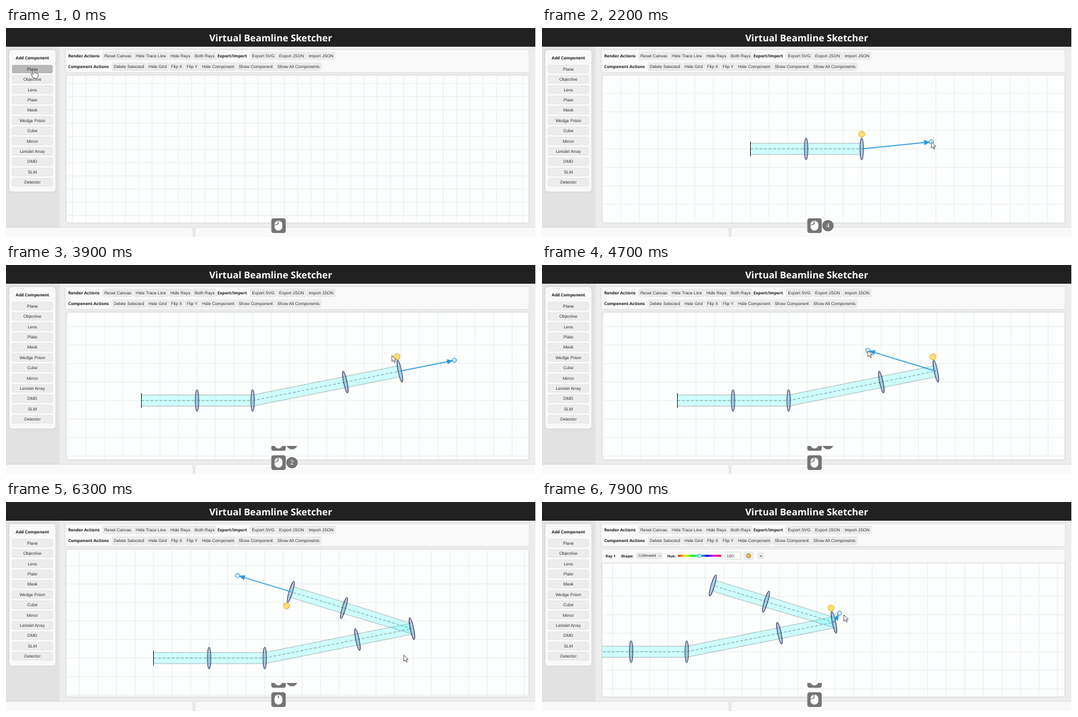
An HTML page for the animation above (8 s loop, 792 by 313 pixels).

```html
<!DOCTYPE html>
<html lang="en">
<head>
<meta charset="utf-8">
<title>Optics editor</title>
<style>
html, body { margin: 0; width: 100%; height: 100%; overflow: hidden; background: #fff; }
svg { display: block; width: 792px; height: 313px; }
text { font: 6.43px "Liberation Sans", Arial, sans-serif; fill: #333; text-rendering: geometricPrecision; }
text.b { font: bold 6.2px "Open Sans", "Noto Sans", sans-serif; fill: #1a1a1a; }
text.s { font-size: 5.6px; }
text.title { font: bold 14.1px "Open Sans", "Noto Sans", sans-serif; fill: #fff; }
.m { text-anchor: middle; }
.btn { fill: #ededed; stroke: #dedede; stroke-width: .7; }
.btn.on { fill: #b8b8b8; stroke: #a8a8a8; }
.card { fill: #f9f9f9; filter: drop-shadow(0 .5px 1px #0002); }
.lens { fill: #7aa6d488; stroke: #2a3350; stroke-width: .95; }
.grid { stroke: #e9ecec; stroke-width: .9; }
.edge { stroke: #555; stroke-width: .75; stroke-dasharray: 1.3 1.3; }
.axis { stroke: #55787c; stroke-width: .7; stroke-dasharray: 4.2 2.6; }
.beam { fill: #00ffff2e; }
.ray { stroke: #2a9ae0; stroke-width: 1.4; }
.cursor { stroke: #333; stroke-width: .75; fill: #fff; stroke-linejoin: round; }
</style>
</head>
<body>
<svg viewBox="0 0 792 313">
  <defs>
    <clipPath id="view"><rect x="89.5" y="70.5" width="692" height="221.5" rx="4"/></clipPath>
    <clipPath id="strip"><rect x="390" y="271" width="50" height="9"/></clipPath>
    <linearGradient id="hue"></linearGradient>
  </defs>
  <rect width="791" height="313" fill="#ededed"/>
  <rect width="80" height="313" fill="#e2e2e2"/>
  <rect width="791" height="28" fill="#212121"/>
  <text class="title m" x="395.5" y="20">Virtual Beamline Sketcher</text>
  <rect class="card" x="5" y="33" width="69" height="212" rx="4"/>
  <rect class="card" x="89" y="33" width="692.5" height="33" rx="2"/>
  <rect class="card" x="-5" y="299" width="284" height="20" rx="4"/>
  <rect class="card" x="283" y="299" width="515" height="20" rx="4"/>
  <rect x="791" width="1" height="313" fill="#fff"/>
  <rect x="89.5" y="70.5" width="692" height="221.5" rx="4" fill="#fdfefe" stroke="#d4d4d4"/>
  <g id="ui"></g>
  <g id="scene" clip-path="url(#view)"></g>
  <g id="overlay"></g>
</svg>
<script>
const $ = id => document.getElementById(id);
const LOOP = 8000, CELL = 27.7, STEP = 3 * CELL;

// Interface
const parts = ['Plane', 'Objective', 'Lens', 'Plate', 'Mask', 'Wedge Prism', 'Cube', 'Mirror',
  'Lenslet Array', 'DMD', 'SLM', 'Detector'];
// Items with a star are labels, the others buttons
const bars = [
  '*Render Actions,Reset Canvas,Hide Trace Line,Hide Rays,Both Rays,*Export/Import,Export SVG,Export JSON,Import JSON',
  '*Component Actions,Delete Selected,Hide Grid,Flip X,Flip Y,Hide Component,Show Component,Show All Components'
];
const text = (s, x, y, cls = '') => `<text class="${cls}" x="${x}" y="${y}">${s}</text>`;
const box = (x, y, w, h, id = '') =>
  `<rect class="btn" id="${id}" x="${x}" y="${y}" width="${w}" height="${h}" rx="1.5"/>`;
const partY = i => 61.5 + i * 15.41;

$('ui').innerHTML = text('Add Component', 39.5, 47, 'b m') + parts.map((s, i) =>
  box(9.5, partY(i) - 5.7, 59.7, 11.4, s) + text(s, 39.4, partY(i) + 2.3, 'm')).join('');

function toolbar(items, y) {
  const pad = 2.4;
  let x = 93;
  for (const item of items.split(',')) {
    const label = item[0] === '*';
    $('ui').insertAdjacentHTML('beforeend',
      label ? text(item.slice(1), x, y + 2.3, 'b') : text(item, x + pad, y + 2.3));
    const el = $('ui').lastElementChild, w = el.getComputedTextLength();
    if (!label) el.insertAdjacentHTML('beforebegin', box(x, y - 5.6, w + 2 * pad, 11.2));
    x += w + (label ? 4.8 : 2 * pad + 1.9);
  }
}
bars.forEach((items, i) => toolbar(items, 41.6 + i * 16.2));

$('hue').innerHTML = [...Array(7).keys()]
  .map(i => `<stop offset="${i / 6}" stop-color="hsl(${i * 60},90%,50%)"/>`).join('');
const rayBar = `<rect x="89" y="70" width="693" height="21" fill="#fafafa"/>
  <path d="M89 91.3H782" stroke="#d6d6d6"/>` +
  text('Ray 1', 95, 82.5, 'b s') + text('Shape:', 118, 82.5, 'b s') + text('Hue:', 187, 82.5, 'b s') +
  box(141.5, 76.5, 38, 8) + text('Collimated', 144, 82.3, 's') +
  `<path d="M174.5 79.7l1.5 1.6 1.5-1.6" fill="none" stroke="#555" stroke-width=".7"/>
  <rect x="203" y="79" width="65" height="3" rx="1.5" fill="url(#hue)"/>
  <circle cx="235.5" cy="80.5" r="2.5" fill="#eff" stroke="#2aa" stroke-width=".9"/>
  <rect x="273" y="75" width="24" height="10.5" fill="#fff" stroke="#ccc" stroke-width=".7"/>` +
  text('180', 276, 82.6) + box(302, 75, 13.5, 11) +
  '<circle cx="308.7" cy="80.5" r="3.1" fill="#f2c230" stroke="#775b20" stroke-width=".7"/>' +
  box(322.5, 76, 9, 8.5) + text('+', 327, 82.5, 'm b s');

const add = (a, b) => a.map((v, i) => v + b[i]);
const mix = (a, b, k) => a.map((v, i) => v + (b[i] - v) * k);
const ease = (t, a, b) => {
  const k = Math.min(1, Math.max(0, (t - a) / (b - a)));
  return k * k * (3 - 2 * k);
};
const turn = (a, b) => Math.atan2(b[1] - a[1], b[0] - a[0]);
const degrees = a => a * 180 / Math.PI;

// Each new component sits at the previous ray's end, which may have been dragged
const dragged = { 3: [11 * CELL, -CELL], 5: [284.6, -75] };
const P = [[0, 0]], angles = [0];
const freeEnd = i => add(P[i], [STEP * Math.cos(angles[i]), STEP * Math.sin(angles[i])]);
for (let i = 1; i < 7; i++) {
  P[i] = dragged[i] || freeEnd(i - 1);
  angles[i] = turn(P[i - 1], P[i]);
}

// The view centres on the components and the last ray
function origin(n) {
  const pts = P.slice(0, n), end = freeEnd(n - 1);
  const right = Math.max(end[0], ...pts.map(p => p[0] + 16));
  const top = Math.min(end[1], ...pts.map(p => p[1] - 16.5));
  return [436.2 - right / 2, 181 - (top + 16.5) / 2];
}

// What the user does; every action starts with a press of the mouse
const actions = [
  { t: 0, does: 'Plane' }, { t: 650, does: 'Lens' }, { t: 1150, does: 'Lens' },
  { t: 1950, does: 'drag', n: 3, until: 2550 },
  { t: 3020, does: 'Lens' }, { t: 3220, does: 'Lens' },
  { t: 4150, does: 'drag', n: 5, until: 4700 },
  { t: 5200, does: 'Lens' }, { t: 5480, does: 'Lens' },
  { t: 6180, does: 'pan', until: 6880 }, { t: 7050, does: 'pick' }
];
const drags = actions.filter(a => a.does === 'drag');
const pan = actions.find(a => a.does === 'pan');
const pick = actions.find(a => a.does === 'pick');
const panFrom = [609, 230], panBy = [-185, -10.3], picked = 4;
const panned = add(origin(7), panBy);

// Multiple clicks count up; a pause or another button starts a new badge
actions.forEach((a, i) => {
  const last = actions[i - 1];
  a.middle = a === pan;
  const same = last && a.t - last.t < 900 && a.middle === last.middle;
  a.count = same ? last.count + 1 : 1;
  a.old = same ? last.old : last;
});

const count = t => actions.filter(a => parts.includes(a.does) && a.t + 100 <= t).length;

function target(a) {
  if (parts.includes(a.does)) return [41.5, partY(parts.indexOf(a.does)) + 1.5];
  if (a.does === 'drag') return add(origin(a.n), freeEnd(a.n - 1));
  return a === pan ? panFrom : add(panned, P[picked]);
}
const release = a => a.n ? add(origin(a.n), dragged[a.n]) : a === pan ? add(panFrom, panBy) : target(a);

function pointer(t) {
  const i = actions.findLastIndex(a => a.t <= t), a = actions[i], next = actions[i + 1];
  const done = a.until || a.t + 30;
  if (t < done) return mix(target(a), release(a), ease(t, a.t, done));
  return next ? mix(release(a), target(next), ease(t, done, next.t - 40))
    : mix(release(a), [451, 169], ease(t, done, 7850));
}

function grid(ox, oy, cell) {
  let d = '';
  for (let x = 89 + (ox - 89) % cell; x < 782; x += cell) d += `M${x} 70V292`;
  for (let y = 70 + (oy - 70) % cell; y < 292; y += cell) d += `M89 ${y}H782`;
  return `<path class="grid" d="${d}"/>`;
}

// Ends of the beam's cross-section at a component, upper one first
function section(i) {
  const [x, y] = P[i], s = Math.sign(Math.cos(angles[i])) * 8.3;
  const dx = Math.sin(angles[i]) * s, dy = -Math.cos(angles[i]) * s;
  return [[x + dx, y + dy], [x - dx, y - dy]];
}

function beam(i) {
  const [a, b] = section(i), [c, d] = section(i + 1);
  return `<path class="beam" d="M${a}L${c}L${d}L${b}Z"/>
    <path class="edge" d="M${a}L${c}M${b}L${d}"/><path class="axis" d="M${P[i]}L${P[i + 1]}"/>`;
}

function component(i) {
  const shape = i ? '<ellipse class="lens" rx="2.6" ry="16.5"/>' : '<path d="M0-11V11" stroke="#222"/>';
  return `<g transform="translate(${P[i]}) rotate(${degrees(angles[i])})">${shape}</g>`;
}

function handles(i, end) {
  return `<path class="ray" d="M${P[i]}L${end}"/>
    <g transform="translate(${end}) rotate(${degrees(turn(P[i], end))})">
    <path d="M-1.5 0L-11-3.8V3.8Z" fill="#2a9ae0"/>
    <circle r="3" fill="#fff" stroke="#2a9ae0" stroke-width="1.2"/></g>
    <g transform="translate(${P[i]}) rotate(${degrees(angles[i])})">
    <circle cy="-22" r="4.5" fill="#ffe070" stroke="#dcb23c"/></g>`;
}

function scene(t) {
  const n = count(t);
  if (!n) return grid(99.5, 83, CELL / 1.4);
  const [ox, oy] = mix(origin(n), panned, ease(t, pan.t, pan.until));
  const focused = t >= pick.t, ids = [...Array(n).keys()];
  const selected = focused ? picked : n - 1;
  const drag = drags.find(d => d.n === n);
  let end = freeEnd(n - 1);
  if (drag) end = mix(end, dragged[n], ease(t, drag.t, drag.until));
  if (focused) end = add(P[picked], [8.3, -13.7]);
  return grid(ox, oy, CELL) + `<g transform="translate(${ox} ${oy})">` +
    ids.slice(1).map(i => beam(i - 1)).join('') + ids.map(component).join('') +
    handles(selected, end) + '</g>' + (focused ? rayBar : '');
}

const badge = ({ count, middle }) => `<rect x="396.5" y="285" width="21.5" height="22" rx="3.5" fill="#747474"/>
  <rect x="401.2" y="288.6" width="11.8" height="14.8" rx="5.9" fill="#fff"/>
  <path d="${middle ? 'M407.1 289.5V294' : 'M406.5 288.5V293.5L401 295.5'}" fill="none" stroke="#747474" stroke-width="1.3"/>` +
  (count > 1 ? `<circle cx="427.3" cy="296" r="8.6" fill="#747474"/>
  <text class="m" x="427.3" y="299.3" style="font-size:9.5px;fill:#fff">${count}</text>` : '');

function overlay(t, [x, y]) {
  const now = actions.findLast(a => a.t <= t);
  const shape = x < 75
    ? 'M-1.2.8C-1.2-1 1-1 1 .8V4.2C2 3.3 3 3.8 3 4.7 4 4 5 4.5 5 5.3 6 4.8 7 5.5 6.9 6.6L6.3 10 5 12.3H-.3L-2.2 9-4.2 6.4C-4.3 5-2.7 4.9-1.2 6.6Z'
    : 'M0 0V9.3L2.2 7.3 3.8 10.8 5.3 10.1 3.8 6.7H6.8Z';
  return (now.old ? `<g clip-path="url(#strip)"><g transform="translate(0 -28.7)">${badge(now.old)}</g></g>` : '') +
    badge(now) + `<path class="cursor" transform="translate(${x} ${y})" d="${shape}"/>`;
}

function frame(now) {
  const t = now % LOOP, at = pointer(t);
  parts.forEach((s, i) => $(s).classList.toggle('on', at[0] < 69 && Math.abs(at[1] - partY(i)) < 5.7));
  $('scene').innerHTML = scene(t);
  $('overlay').innerHTML = overlay(t, at);
  requestAnimationFrame(frame);
}
requestAnimationFrame(frame);
</script>
</body>
</html>
```
